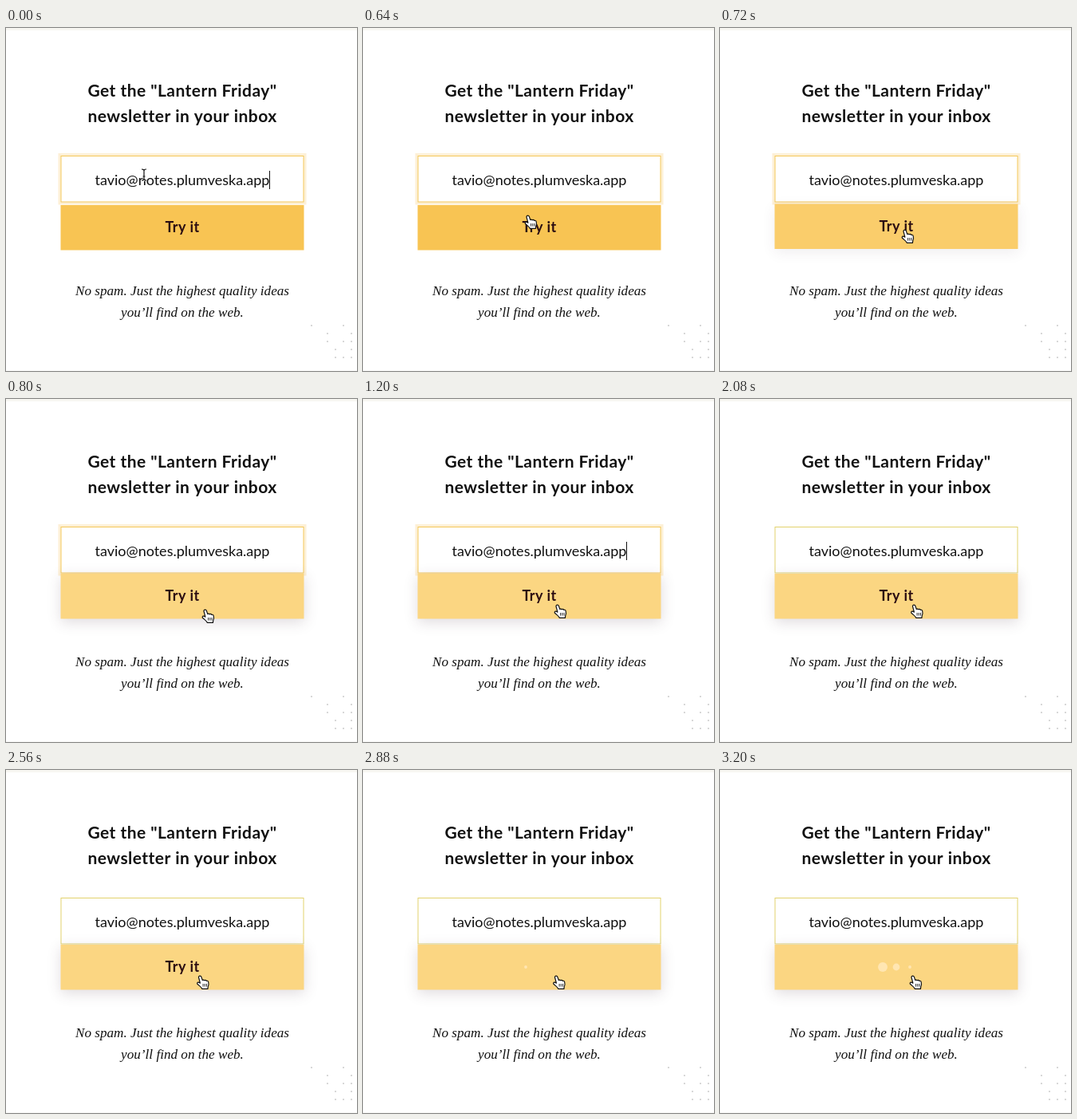
Write an HTML page with a canvas that moves like this. It is 440x430 px and loops after 3.28 s.

```html
<!DOCTYPE html>
<html lang="en">
<head>
<meta charset="utf-8">
<title>Newsletter form</title>
<style>
  html, body { margin: 0; width: 100%; height: 100%; overflow: hidden; background: #fff; }
  canvas { display: block; width: 440px; height: 430px; }
</style>
</head>
<body>
<canvas id="stage"></canvas>
<script>
const W = 440, H = 430, LOOP = 3280, STEP = 80;
const MID = 221, LEFT = 68.5, WIDE = 305;
const EMAIL = 'tavio@notes.plumveska.app';
const SANS = 'Lato, sans-serif';
const HEADING = '700 21px ' + SANS;
const NOTE = 'italic 17.15px "Liberation Serif", serif';

const canvas = document.getElementById('stage');
const ctx = canvas.getContext('2d');
const ratio = window.devicePixelRatio || 1;
canvas.width = W * ratio;
canvas.height = H * ratio;

// Pointer hotspot: time, x, y
const PATH = [
  [400, 173, 184], [480, 178, 196], [560, 190, 216], [640, 207, 236],
  [720, 232, 254], [800, 250, 265], [880, 248, 263], [960, 244, 259],
  [1360, 244, 259], [1520, 243.5, 259], [2560, 243.5, 259], [3040, 242, 259]
];

const DOTS = [
  [383, 373], [423, 373], [403, 383], [433, 383], [403, 393], [423, 393],
  [433, 393], [413, 403], [433, 403], [413, 413], [423, 413], [433, 413]
];

const clamp = v => Math.min(1, Math.max(0, v));
const progress = (t, from, to) => clamp((t - from) / (to - from));
const ease = p => p * p * (3 - 2 * p);
const mix = (a, b, p) => a + (b - a) * p;
const blend = (a, b, p) => `rgb(${a.map((v, i) => Math.round(mix(v, b[i], p)))})`;

function pointerAt(t) {
  const next = PATH.findIndex(k => k[0] > t);
  if (next === 0) return PATH[0].slice(1);
  if (next < 0) return PATH[PATH.length - 1].slice(1);
  const a = PATH[next - 1], b = PATH[next];
  const p = progress(t, a[0], b[0]);
  return [mix(a[1], b[1], p), mix(a[2], b[2], p)];
}

function rect(x, y, w, h, color) {
  ctx.fillStyle = color;
  ctx.fillRect(x, y, w, h);
}

function disc(x, y, r, color) {
  ctx.fillStyle = color;
  ctx.beginPath();
  ctx.arc(x, y, r, 0, Math.PI * 2);
  ctx.fill();
}

function label(text, y, font, color, tracking = 0) {
  ctx.font = font;
  ctx.letterSpacing = tracking + 'px';
  ctx.fillStyle = color;
  ctx.textAlign = 'center';
  ctx.fillText(text, MID, y);
}

function drawPage() {
  rect(0, 0, W, H, '#fff');
  rect(0, 0, W, 3, '#f8f7f2');
  rect(0, 429, W, 1, '#f8f8f6');
  label('Get the "Lantern Friday"', 86, HEADING, '#111', 0.45);
  label('newsletter in your inbox', 118, HEADING, '#111', 0.45);
  label('No spam. Just the highest quality ideas', 335, NOTE, '#111');
  label('you’ll find on the web.', 362, NOTE, '#111');
  DOTS.forEach(([x, y]) => disc(x, y, 1.1, '#cfcfcf'));
}

function drawInput(t) {
  const blur = progress(t, 1280, 1520);
  rect(LEFT - 3, 157, WIDE + 6, 64.5, `rgba(253, 240, 214, ${1 - blur})`);
  rect(LEFT, 160, WIDE, 58.5, blend([244, 200, 88], [226, 210, 108], blur));
  rect(LEFT + 1, 161, WIDE - 2, 56.5, '#fff');
  label(EMAIL, 197, '400 18px ' + SANS, '#111');
  if (t < 480 || (t >= 1040 && t < 1360)) {
    const end = MID + ctx.measureText(EMAIL).width / 2;
    rect(Math.round(end), 179, 1, 23, '#111');
  }
}

function loaderScale(elapsed) {
  const phase = elapsed / 1400;
  if (phase <= 0 || phase >= 0.8) return 0;
  return ease(phase < 0.4 ? phase / 0.4 : (0.8 - phase) / 0.4);
}

function drawButton(t) {
  const hover = ease(progress(t, 640, 800));
  const lift = 3 * hover;
  ctx.save();
  ctx.shadowColor = `rgba(70, 45, 65, ${0.17 * hover})`;
  ctx.shadowBlur = 16 * ratio;
  ctx.shadowOffsetY = 4 * ratio;
  rect(LEFT, 222 - lift, WIDE, 56.5, blend([248, 196, 83], [251, 214, 130], hover));
  ctx.restore();

  ctx.globalAlpha = 1 - progress(t, 2560, 2860);
  label('Try it', 256 - lift, '700 18px ' + SANS, '#2b0d12', 0.4);
  ctx.globalAlpha = 1;

  for (let i = 0; i < 3; i++) {
    const size = loaderScale(t - 2670 - i * 160);
    if (size > 0) disc(204 + i * 17, 247, 6 * size, '#ffe6b2');
  }
}

const HAND = new Path2D(
  'M-2 1 Q-2 -.8 -.4 -.8 Q1 -.8 1.5 .8 L2.8 4.6 Q4 3.4 5.2 4.8 ' +
  'Q6.8 3.9 7.7 5.4 Q9.7 4.8 10.2 6.8 Q11 10 9.8 12.4 L9.4 15.4 L2.4 15.4 ' +
  'Q1.2 13.4 -.6 11.9 L-3.6 9.2 Q-4.2 7.6 -2.8 7.1 Q-1.4 7 -.1 8.2 Z'
);
const FOLDS = new Path2D('M3.6 9 V12.6 M5.8 9 V12.6 M8 9 V12.6');
const BEAM = new Path2D('M-3 -7 Q0 -7 0 -5 Q0 -7 3 -7 M0 -5 V5 M-3 7 Q0 7 0 5 Q0 7 3 7 M-1.5 2 H1.5');

function stroke(path, width, color) {
  ctx.lineWidth = width;
  ctx.strokeStyle = color;
  ctx.stroke(path);
}

function drawPointer(t) {
  const [x, y] = pointerAt(t);
  ctx.save();
  ctx.translate(x, y);
  ctx.lineJoin = 'round';
  if (y < 222) {
    stroke(BEAM, 2.6, '#fff');
    stroke(BEAM, 1.2, '#111');
  } else {
    ctx.fillStyle = '#fff';
    ctx.fill(HAND);
    stroke(HAND, 1.2, '#111');
    stroke(FOLDS, 0.9, '#111');
  }
  ctx.restore();
}

function draw(now) {
  const t = Math.floor((now % LOOP) / STEP) * STEP;
  ctx.setTransform(ratio, 0, 0, ratio, 0, 0);
  drawPage();
  drawInput(t);
  drawButton(t);
  drawPointer(t);
}

const start = performance.now();
function tick() {
  draw(performance.now() - start);
  requestAnimationFrame(tick);
}
tick();
</script>
</body>
</html>
```
